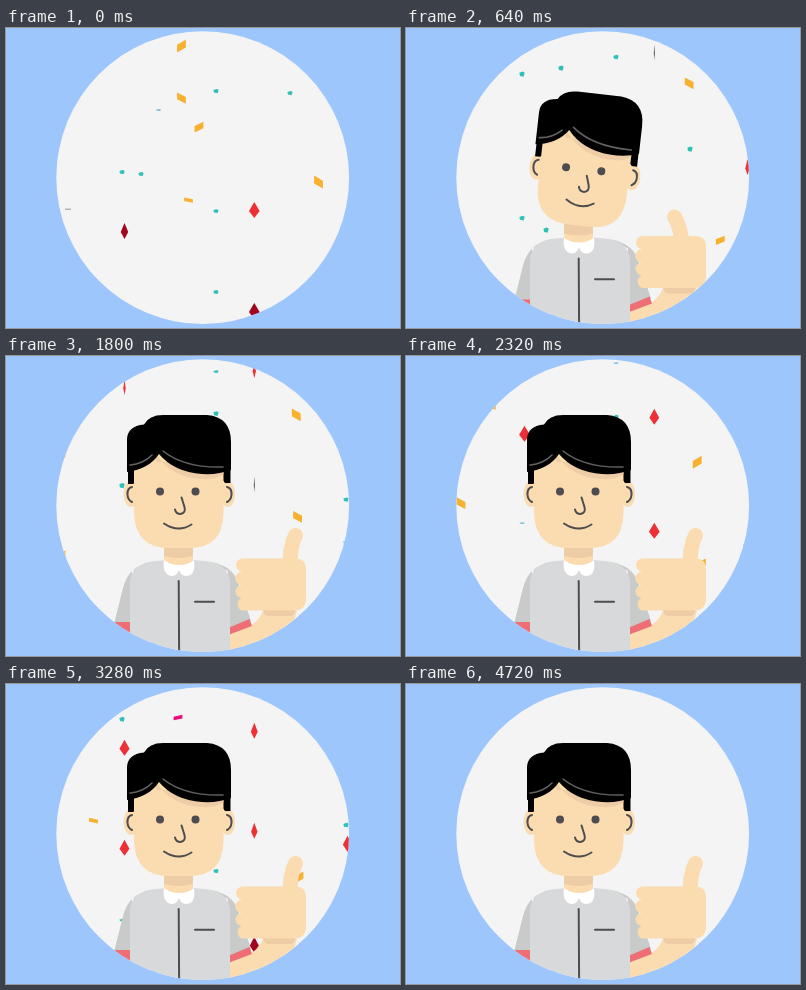
Write an HTML page that moves like this. It is 394 px wide and 300 px high and loops after 4.76 s.

```html
<!DOCTYPE html>
<html lang="en">
<head>
<meta charset="utf-8">
<title>Thumbs up</title>
<style>
  html, body { margin: 0; width: 100%; height: 100%; overflow: hidden; background: #9dc6fd; }
  svg { display: block; width: 394px; height: 300px; }
  .skin { fill: #fbdcb1; }
  .shade { fill: #edcca6; }
  .line { fill: none; stroke: #4d4d4f; stroke-width: 2; stroke-linecap: round; }
  .dot { fill: #4d4d4f; }
  .shirt { fill: #d8d9db; }
  .sleeve { fill: #c9cbcb; }
  .band { fill: #ed6e75; }
  .strand { fill: none; stroke: #626264; stroke-width: 1.6; stroke-linecap: round; }
  #thumb { fill: none; stroke: #fbdcb1; stroke-width: 15; stroke-linecap: round; }
</style>
</head>
<body>
<svg viewBox="0 0 394 300">
  <clipPath id="disc"><circle cx="196.7" cy="149.6" r="146.4"/></clipPath>
  <rect width="394" height="300" fill="#9dc6fd"/>
  <g clip-path="url(#disc)">
    <rect width="394" height="300" fill="#f4f4f4"/>
    <g id="confetti"></g>
    <g id="person">
      <path class="sleeve" d="M146 206Q123 209 117 232L108 268H126V215Z"/>
      <path class="sleeve" d="M205 206Q229 210 234 232L245 265L222 276V215Z"/>
      <path class="skin" d="M108 276H125V310H108Z"/>
      <path class="band" d="M108 266H125V276H107Z"/>
      <path class="skin" d="M222 279L246 269Q255 262 258 252H291Q289 274 262 310H222Z"/>
      <path class="band" d="M222 272L243.500 263L246 270L222 279Z"/>
      <path class="shirt" d="M124 310V226Q126 207 149 205L173 203L199 205Q222 207 224 226V310Z"/>
      <path class="line" d="M172.700 225L173.200 310M189 245.700H208" stroke-linecap="butt"/>
      <path class="skin" d="M158 180H187V207Q181 211 173 211Q164 211 158 207Z"/>
      <path class="shade" d="M158 189H187V200Q173 204 158 200Z"/>
      <path fill="#fff" d="M158 204Q164 209 173 209Q182 209 188 204Q190 219 181 220Q175 220 173 214Q171 220 165 220Q156 218 158 204Z"/>

      <g id="head">
        <ellipse class="skin" cx="125" cy="138" rx="7.500" ry="13"/>
        <ellipse class="skin" cx="221.500" cy="138" rx="7.500" ry="13"/>
        <path class="line" stroke-width="1.500" d="M126 131Q121 132 121.500 139Q122 144 126 146M221 131Q226 132 225.500 139Q225 144 221 146"/>
        <path d="M122 108H131V125L127 128H122ZM215 108H224.500V127H219L215 122Z"/>
        <path class="skin" d="M128 94H217.500V157Q217 192 184 192H163Q129 192 128 157Z"/>
        <path class="shade" d="M150 98Q168 125 204 123Q213 122 217.500 118V106H150Z"/>
        <path d="M121 116V84Q121 70 138 68.500Q143 59 157 59H201Q225 61 225 86V114Q212 119 196 118Q168 116 153 98Q143 113 121 116Z"/>
        <path class="strand" d="M124 109Q137 108 146 99M157 95Q178 112 217 111"/>
        <circle class="dot" cx="154" cy="135.500" r="4"/>
        <circle class="dot" cx="189.500" cy="135.500" r="4"/>
        <path class="line" d="M175.500 141.500L178.500 151Q180 157 174.500 158Q170 158 169 153.500M158 167.500Q172 177 185.500 168.500"/>
      </g>

      <path class="shade" d="M256 250H291Q290 256 286 260H261Q257 258 256 250Z"/>
      <path id="thumb"/>
      <path class="skin" d="M237 202.500H290Q300 202.500 300 213V242Q300 254.500 288 254.500H237A6.500 6.500 0 0 1 236 242A6.500 6.500 0 0 1 236 229A6.500 6.500 0 0 1 236 215.500A6.500 6.500 0 0 1 237 202.500Z"/>
    </g>
  </g>
</svg>
<script>
const LOOP = 4760, CLEAR = 4700;
const $ = id => document.getElementById(id);
const clamp = v => Math.max(0, Math.min(1, v));
const smooth = v => v * v * (3 - 2 * v);
const mix = (a, b, k) => a + (b - a) * k;
const poly = pts => 'M' + pts.map(p => p.map(v => v.toFixed(2)).join(' ')).join('L') + 'Z';

// Each kind flips as it falls; the flip follows the height.
function kite(x, y) {
  const w = 5.4 * Math.abs(Math.sin(Math.PI * (y - 24) / 102));
  const fill = w < 0.8 ? '#444' : y > 195 ? '#a0061c' : '#ec3035';
  const r = Math.max(w, 0.5);
  return [poly([[x, y - 8], [x + r, y + 1], [x, y + 8], [x - r, y + 1]]), fill];
}

function slip(x, y, fill = '#f8b02f') {
  const s = Math.cos(2 * Math.PI * (y - 16) / 92);
  const d = 2.6 * s, h = 0.7 + 3.2 * Math.abs(s);
  return [poly([[x - 4.4, y + d - h], [x + 4.4, y - d - h], [x + 4.4, y - d + h], [x - 4.4, y + d + h]]), fill];
}

function chip(x, y) {
  const s = Math.abs(Math.sin(Math.PI * (y - 5) / 80));
  const h = 0.5 + 2.2 * s;
  return [poly([[x - 2.6, y - 0.5 * h], [x + 0.5, y - h], [x + 2.7, y - 0.6 * h], [x + 1.6, y + h], [x - 2, y + 0.7 * h]]),
    s < 0.3 ? '#4fa9cb' : '#2fc0b6'];
}

const pink = (x, y) => slip(x, y, '#e9087d');
const edge = (x, y) => [poly([[x - 3, y - 0.4], [x + 3, y - 0.4], [x + 3, y + 0.4], [x - 3, y + 0.4]]), '#777'];

// kind, speed in px/ms, x, heights at time zero, sideways drift per px
const columns = [
  [kite, 0.0895, 248.300, [283, 182, -33, -147, -247]],
  [kite, 0.0895, 118.500, [203, -130, -230]],
  [kite, 0.0895, 341.500, [82, -134, -255]],
  [slip, 0.091, 175.500, [18, 70]],
  [slip, 0.091, 193, [99]],
  [slip, 0.091, 182.500, [172]],
  [slip, 0.091, 312.500, [154], 0.03],
  [slip, 0.091, 278.500, [-3], 0.08],
  [slip, 0.091, 287, [-105], 0.02],
  [slip, 0.091, 55, [37, -64]],
  [slip, 0.091, 80, [-162], 0.025],
  [slip, 0.091, 186, [-338]],
  [slip, 0.091, 307, [-283]],
  [pink, 0.091, 172, [-265]],
  [edge, 0.091, 62, [181, -253]],
  [chip, 0.072, 116, [144, 0, -201]],
  [chip, 0.0875, 210, [264, 183, 63, -27, -100, -142, -196, -342]],
  [chip, 0.0875, 284, [65, -354]],
  [chip, 0.0875, 152.500, [82, -16], 0.045],
  [chip, 0.0875, 135, [146], 0.09],
  [chip, 0.0875, 160, [-338]],
  [chip, 0.0875, 340, [29, -14, -146]]
];

const pieces = columns.flatMap(([kind, speed, x, starts, drift = 0]) => starts.map(y => {
  const el = document.createElementNS('http://www.w3.org/2000/svg', 'path');
  $('confetti').append(el);
  return { el, kind, speed, x, y, drift };
}));

function draw(t) {
  $('confetti').style.display = t < CLEAR ? '' : 'none';
  for (const p of pieces) {
    const fall = p.speed * t;
    const [d, fill] = p.kind(p.x + p.drift * fall, p.y + fall);
    p.el.setAttribute('d', d);
    p.el.setAttribute('fill', fill);
  }

  const rise = 240 * (1 - clamp((t - 20) / 867)) ** 3;
  $('person').setAttribute('transform', `translate(0 ${rise.toFixed(2)})`);

  const tilt = 8.64 * (1 - smooth(clamp((t - 480) / 480)));
  $('head').setAttribute('transform', `rotate(${tilt.toFixed(2)} 172 189)`);

  const k = smooth(clamp((t - 640) / 360));
  const at = (x0, y0, x1, y1) => `${mix(x0, x1, k).toFixed(2)} ${mix(y0, y1, k).toFixed(2)}`;
  $('thumb').setAttribute('d',
    `M${at(276, 208, 285, 211)}Q${at(274, 192, 282.5, 193)} ${at(268.5, 183.5, 289.5, 179.5)}`);
}

const start = performance.now();
function tick() {
  draw((performance.now() - start) % LOOP);
  requestAnimationFrame(tick);
}
tick();
</script>
</body>
</html>
```
